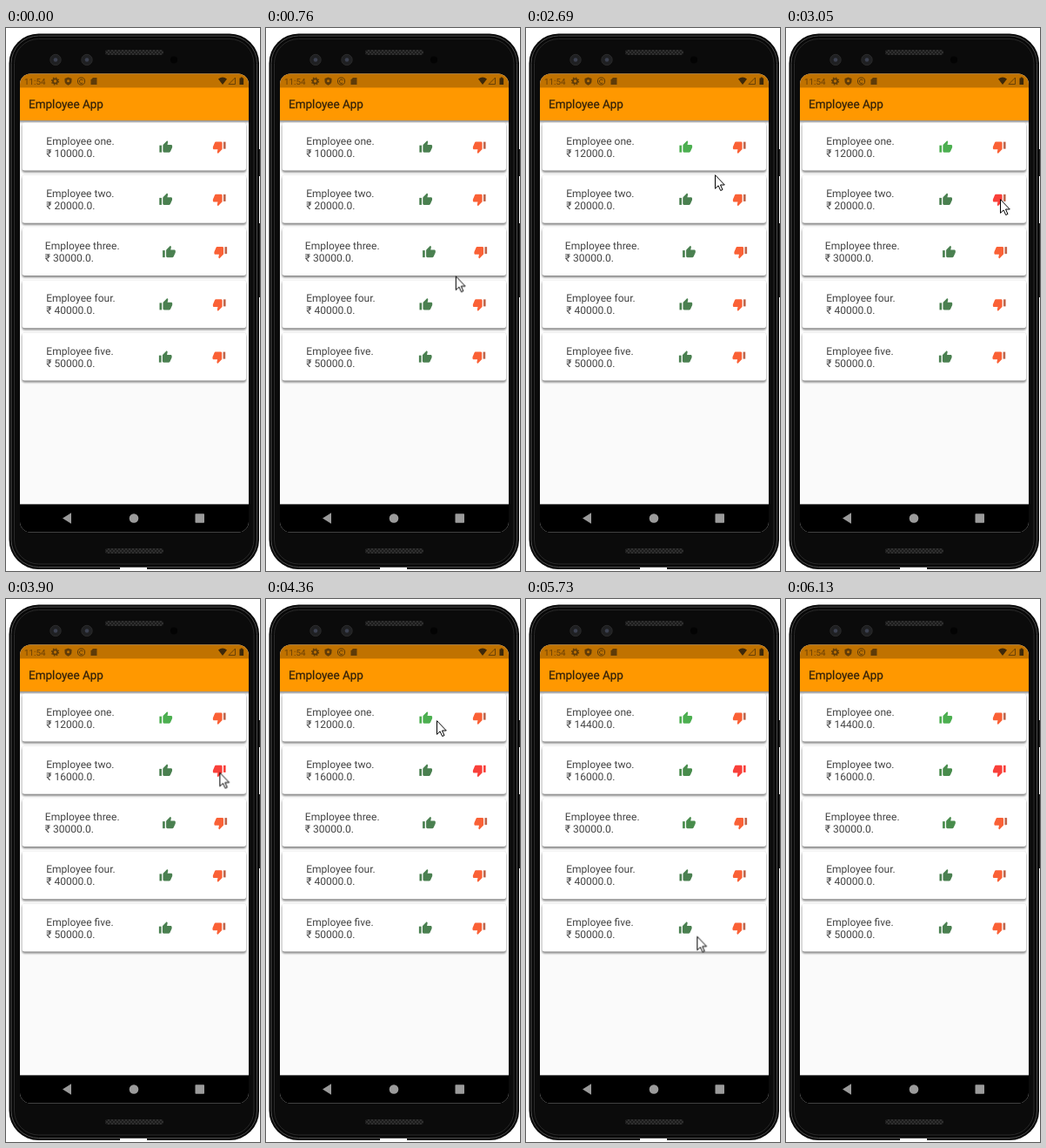
Animation, 292 px wide and 623 px high, one loop 6860 ms. Source, as an HTML page:

```html
<!DOCTYPE html>
<html lang="en">
<head>
<meta charset="utf-8">
<title>Employee App</title>
<style>
html, body { margin: 0; width: 100%; height: 100%; overflow: hidden; background: #fff; }
svg { display: block; }
text { font-family: Roboto, "Noto Sans", sans-serif; text-rendering: geometricPrecision; }
.row text { font-size: 12.06px; fill: #444; }
.card { fill: #fff; filter: drop-shadow(0 2px 1.3px rgba(0,0,0,.42)) drop-shadow(0 0 .7px rgba(0,0,0,.2)); }
.up { fill: #4a8050; }
.down { fill: #fa6136; }
.down .bar { fill: #c0664c; }

.step { animation: 6860ms step-end infinite; }
.pay1a { animation-name: pay1a; }
.pay1b { animation-name: pay1b; }
.pay1c { animation-name: pay1c; }
.pay2a { animation-name: pay2a; }
.pay2b { animation-name: pay2b; }
.up1 { animation-name: up1; }
.up2, .up3 { animation-name: up23; }
.down2 { animation: fist2 6860ms step-end infinite; }
.down2 .bar { animation: bar2 6860ms step-end infinite; }
#click { animation-name: click; }
#pointer { animation-name: present; }
#arrow { animation: move 6860ms linear infinite; }

@keyframes pay1a { 0% { opacity: 1 } 33.673%, 100% { opacity: 0 } }
@keyframes pay1b { 0% { opacity: 0 } 33.673% { opacity: 1 } 73.907%, 100% { opacity: 0 } }
@keyframes pay1c { 0% { opacity: 0 } 73.907%, 100% { opacity: 1 } }
@keyframes pay2a { 0% { opacity: 1 } 51.458%, 100% { opacity: 0 } }
@keyframes pay2b { 0% { opacity: 0 } 51.458%, 100% { opacity: 1 } }
@keyframes up1 { 0% { fill: #4a8050 } 33.673%, 100% { fill: #4caf50 } }
@keyframes up23 { 0% { fill: #4a8050 } 81%, 100% { fill: #488c4c } }
@keyframes fist2 { 0% { fill: #fa6136 } 44.461%, 100% { fill: #f9403a } }
@keyframes bar2 { 0% { fill: #c0664c } 51.458%, 100% { fill: #f9403a } }
@keyframes click {
  0% { opacity: 0 }
  26.385% { opacity: 1 } 29.592% { opacity: 0 }
  47.959% { opacity: 1 } 50.583% { opacity: 0 }
  69.679% { opacity: 1 } 72.741%, 100% { opacity: 0 }
}
@keyframes present { 0% { opacity: 0 } 6.997% { opacity: 1 } 89.359%, 100% { opacity: 0 } }
@keyframes move {
  0%, 6.997% { transform: translate(284px, 571px) }
  9.038% { transform: translate(255px, 430px) }
  11.079% { transform: translate(218px, 285px) }
  12.828% { transform: translate(192px, 198px) }
  14.286%, 18.805% { transform: translate(180px, 163px) }
  21.429%, 22.157% { transform: translate(181px, 141px) }
  23% { transform: translate(181px, 136px) }
  24.052%, 33.673% { transform: translate(182px, 138px) }
  39.213%, 39.5% { transform: translate(217px, 168px) }
  43.44% { transform: translate(240px, 193px) }
  44.461%, 56.56% { transform: translate(246px, 196px) }
  58.017% { transform: translate(243px, 208px) }
  60.6% { transform: translate(221px, 172px) }
  63.557%, 63.848% { transform: translate(196px, 139px) }
  65.598%, 78.425% { transform: translate(183px, 135px) }
  78.426%, 78.863% { transform: translate(180px, 150px) }
  80.175% { transform: translate(177.5px, 205px) }
  81.633% { transform: translate(180px, 285px) }
  84.548% { transform: translate(205px, 440px) }
  88.338% { transform: translate(244.5px, 604px) }
  88.776%, 100% { transform: translate(246px, 613px) }
}
</style>
</head>
<body>
<svg width="292" height="623" viewBox="0 0 292 623">
  <defs>
    <clipPath id="screen"><rect x="16" y="52.500" width="263" height="526" rx="12"/></clipPath>
    <pattern id="mesh" width="4" height="4" patternUnits="userSpaceOnUse">
      <rect width="4" height="4" fill="#1b1b1b"/>
      <path d="M0 0L4 4M4 0L0 4" stroke="#383838" stroke-width=".7"/>
    </pattern>
    <g id="thumbUp">
      <path d="M1 21h4V9H1z"/>
      <path d="M23 10c0-1.1-.9-2-2-2h-6.31l.95-4.57.03-.32c0-.41-.17-.79-.44-1.06L14.17 1 7.59 7.59C7.22 7.95 7 8.45 7 9v10c0 1.1.9 2 2 2h9c.83 0 1.54-.5 1.84-1.22l3.02-7.05c.09-.23.14-.47.14-.73z"/>
    </g>
    <path id="fist" d="M15 3H6c-.83 0-1.54.5-1.84 1.22l-3.02 7.05c-.09.23-.14.47-.14.73v2c0 1.1.9 2 2 2h6.31l-.95 4.57-.03.32c0 .41.17.79.44 1.06L9.83 23l6.59-6.59c.36-.36.58-.86.58-1.41V5c0-1.1-.9-2-2-2z"/>
  </defs>

  <!-- phone body -->
  <g fill="#1c1c1c">
    <rect x="289" y="139" width="3" height="31"/>
    <rect x="289" y="224" width="3" height="85"/>
  </g>
  <rect x="3.500" y="6.500" width="287.500" height="614.500" rx="34" fill="#080808"/>
  <rect x="6" y="9" width="282.500" height="609.500" rx="31.500" fill="none" stroke="#4a4a4a"/>
  <rect x="9.500" y="12.500" width="275.500" height="602.500" rx="28" fill="#0b0b0b" stroke="#2a2a2a"/>
  <rect x="131" y="619" width="31" height="4" fill="#fff"/>
  <rect x="114" y="25" width="67" height="6" rx="3" fill="url(#mesh)"/>
  <rect x="114" y="597" width="67" height="6" rx="3" fill="url(#mesh)"/>
  <g fill="#1f2022" stroke="#2b2b2b">
    <circle cx="57" cy="36.500" r="6.200"/>
    <circle cx="93" cy="36.500" r="6.200"/>
  </g>
  <circle cx="193" cy="36.500" r="4" fill="#030303"/>
  <g fill="#3c4150">
    <circle cx="57" cy="36.500" r="2.300"/>
    <circle cx="93" cy="36.500" r="2.300"/>
  </g>

  <!-- screen -->
  <g clip-path="url(#screen)">
    <rect x="16" y="52" width="263" height="527" fill="#fafafa"/>
    <rect x="10" y="68" width="275" height="38" fill="#ff9800" style="filter:drop-shadow(0 2px 1.3px rgba(0,0,0,.42))"/>
    <rect x="16" y="52" width="263" height="16.400" fill="#c07200"/>
    <rect x="16" y="546.400" width="263" height="33" fill="#000"/>
  </g>
  <g fill="#5f3b08">
    <text x="21" y="64.500" font-size="9.800" fill="#6a3f05">11:54</text>
    <circle cx="56.500" cy="61" r="2.600" fill="none" stroke="#5f3b08" stroke-width="1.800"/>
    <circle cx="56.500" cy="61" r="4" fill="none" stroke="#5f3b08" stroke-width="1.200" stroke-dasharray="1.570"/>
    <path d="M71.500 56.500l4 1.500v3q0 3-4 4.700q-4-1.700-4-4.700v-3z"/>
    <circle cx="71.500" cy="60.700" r="1.500" fill="#c07200"/>
    <g fill="none" stroke="#5f3b08">
      <circle cx="86.500" cy="61" r="4.100"/>
      <path d="M88 63a2.200 2.200 0 1 1 .6-2.700"/>
    </g>
    <path d="M100 57h4.500v8H97.500v-5.500z"/>
    <path d="M244 58.500q5-4 10 0l-5 6.500z" fill="#3d2809"/>
    <path d="M263.500 57v7.500H256z" fill="none" stroke="#5f3b08" stroke-width=".9"/>
    <path d="M268.500 57.500h1.300v-1h2v1h1.300v7.500h-4.600z" fill="#3d2809"/>
  </g>
  <text x="26" y="92" font-size="13.500" fill="#33220a" stroke="#33220a" stroke-width=".25">Employee App</text>
  <g fill="#9b9b9b">
    <path d="M65 562.500l10-6.200v12.400z"/>
    <circle cx="147" cy="562.500" r="5.300"/>
    <rect x="217.500" y="557.300" width="10.500" height="10.500" rx=".8"/>
  </g>
  <g id="list"></g>

  <!-- pointer -->
  <g id="pointer" class="step">
    <g id="arrow">
      <circle id="click" class="step" r="12" fill="#ff0" fill-opacity=".47"/>
      <path d="M.5 .7V16.300L4.100 12.900L6.700 18.500L9 17.500L6.500 12H11.300Z" fill="#fff" stroke="#000"/>
    </g>
  </g>
</svg>
<script>
// name, text x, thumb-up centre, thumb-down centre, successive salaries
const staff = [
  ["one", 46.3, 183.7, 245.2, [10000, 12000, 14400]],
  ["two", 46.2, 183.6, 245.2, [20000, 16000]],
  ["three", 44.8, 187.4, 246.7, [30000]],
  ["four", 46.2, 183.8, 245.2, [40000]],
  ["five", 46.3, 183.2, 244.8, [50000]]
];

const icon = (cls, x, y, parts) =>
  `<g class="${cls}" transform="translate(${x - 8} ${y - 8}) scale(.67)">${parts}</g>`;

const row = ([name, x, up, down, pays], i) => {
  const n = i + 1, top = 108.6 + i * 60.25, mid = top + 28;
  const salary = (pay, k) => {
    const cls = pays.length > 1 ? `step pay${n}${"abc"[k]}` : "";
    return `<text class="${cls}" x="${x}" y="${top + 39}">₹ ${pay}.0.</text>`;
  };
  return `<g class="row">
    <rect class="card" x="18.600" y="${top}" width="257.400" height="54.900" rx="2.700"/>
    <text x="${x}" y="${top + 25}">Employee ${name}.</text>
    ${pays.map(salary).join("")}
    ${icon(`up step up${n}`, up, mid, '<use href="#thumbUp"/>')}
    ${icon(`down down${n}`, down, mid, '<use href="#fist"/><path class="bar" d="M19 3v12h4V3z"/>')}
  </g>`;
};

document.getElementById("list").innerHTML = staff.map(row).join("");
</script>
</body>
</html>
```
